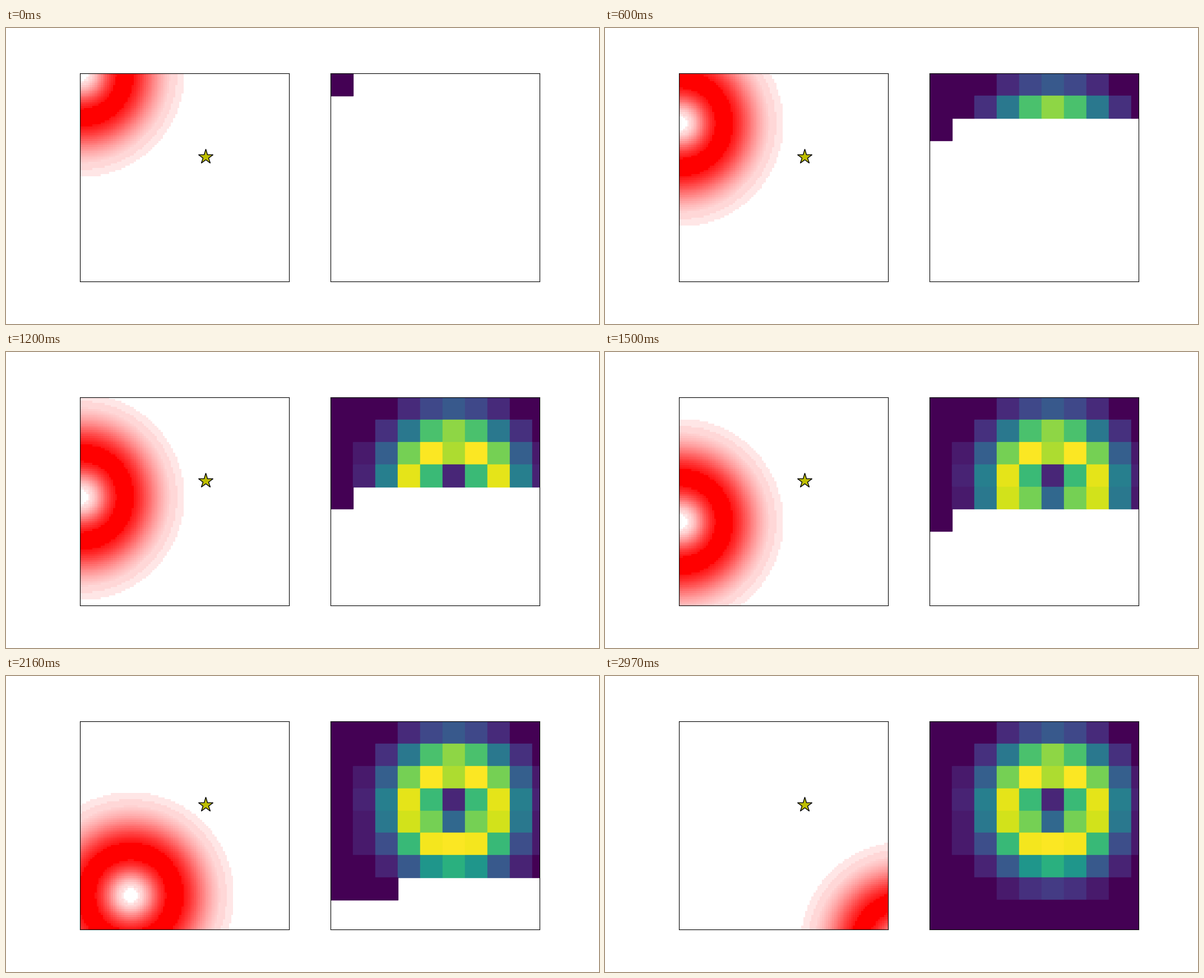
These frames come from a looping animation (1058x529 px, 3000 ms). A matplotlib script:

```python
import matplotlib.pyplot as plt
import numpy as np
from matplotlib.animation import FuncAnimation
from matplotlib.colors import LinearSegmentedColormap
from matplotlib.patches import Rectangle

DPI = 100
SIZE = 101            # pixels along each side of the scanned field
STEP = 12             # beam step between two exposures
GRID = 10             # exposures per row
SIGMA = 15
STAR = (60, 40)

WHITE_RED = LinearSegmentedColormap.from_list("white_red", ["white", "red"])
VIRIDIS = plt.get_cmap("viridis")


def donut(dx, dy):
    """Ring-shaped beam, scaled to a peak of 1."""
    x = (dx ** 2 + dy ** 2) / (2 * SIGMA ** 2)
    return x * np.exp(1 - x)


def beam(col, row):
    y, x = np.mgrid[:SIZE, :SIZE]
    v = donut(x - col * STEP, y - row * STEP)
    # coarse tones at both ends of the scale
    return np.select([v < 0.06, v < 0.11, v < 0.18, v > 0.92],
                     [0, 0.1, 0.16, 1], v)


def signal(col, row):
    v = donut(col * STEP - STAR[0], row * STEP - STAR[1])
    if v < 0.035:
        return 0.0
    if v < 0.08:
        return 0.07
    return v + 0.015 if v < 0.16 else v


fig, (left, right) = plt.subplots(1, 2, figsize=(1058 / DPI, 529 / DPI), dpi=DPI)
for ax in (left, right):
    ax.set_xticks([])
    ax.set_yticks([])

image = left.imshow(beam(0, 0), cmap=WHITE_RED, vmin=0, vmax=1,
                    interpolation="nearest")
left.plot(*STAR, "*", color="y", markersize=20, markeredgecolor="k",
          markeredgewidth=1)
left.set_xlim(-0.5, SIZE - 0.5)
left.set_ylim(SIZE - 0.5, -0.5)

right.set_xlim(-STEP / 2, SIZE - 1 + STEP / 2)
right.set_ylim(SIZE - 1 + STEP / 2, -STEP / 2)
right.set_aspect("equal")

cells = []
for i in range(GRID * GRID):
    row, col = divmod(i, GRID)
    corner = ((col - 0.5) * STEP, (row - 0.5) * STEP)
    cell = Rectangle(corner, STEP, STEP, color=VIRIDIS(signal(col, row)),
                     linewidth=1)
    cells.append(right.add_patch(cell))


def update(n):
    row, col = divmod(n, GRID)
    image.set_data(beam(col, row))
    for i, cell in enumerate(cells):
        cell.set_visible(i <= n)
    return [image, *cells]


anim = FuncAnimation(fig, update, frames=GRID * GRID, interval=30,
                     init_func=lambda: update(0), repeat=True, repeat_delay=0)
plt.show()
```
